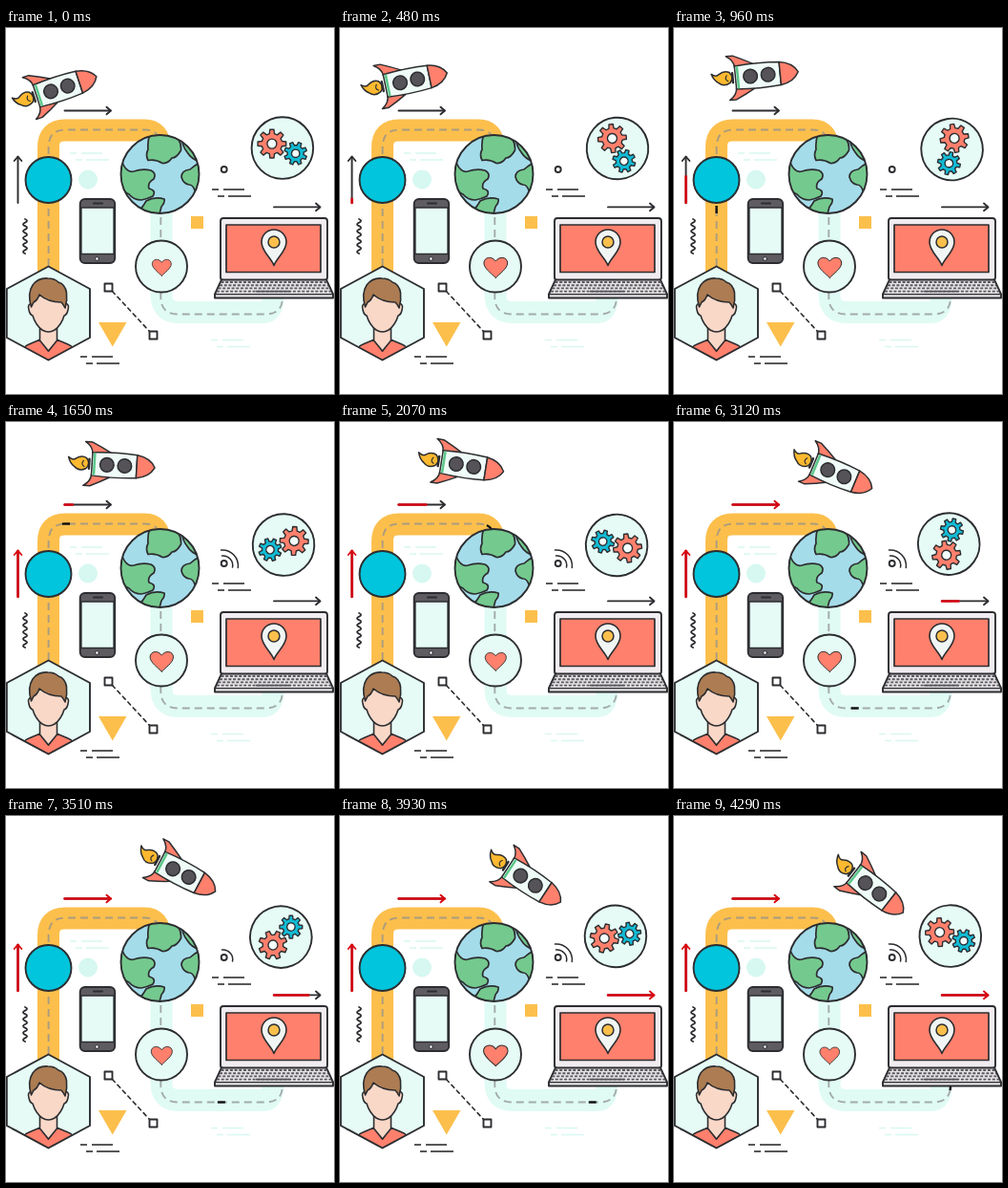
Recreate the animation shown at these times as an HTML page. Size 344x383 px, loop 4.32 s.

```html
<!DOCTYPE html>
<html lang="en">
<head>
<meta charset="utf-8">
<title>Connected journey</title>
<style>
  html, body { margin: 0; width: 100%; height: 100%; overflow: hidden; background: #fff; }
  svg { display: block; width: 344px; height: 383px; }
  .ink { stroke: #2c2d30; stroke-linejoin: round; stroke-linecap: round; }
  .none { fill: none; }
  .mint { fill: #e6fbf5; }
  .coral { fill: #ff806c; }
  .skin { fill: #f9d8c8; }
  .land { fill: #74c98e; }
</style>
</head>
<body>
<svg viewBox="0 0 344 383" stroke-width="1.9" xmlns="http://www.w3.org/2000/svg">
  <defs>
    <clipPath id="globeClip"><circle cx="161.5" cy="153" r="41"/></clipPath>
    <clipPath id="hexClip"><path d="M44.5 249.5 88 273V324L44.5 347.5 .8 324V273Z"/></clipPath>
    <path id="route" d="M44.6 340V125Q44.6 106.5 62 106.5H146Q162.3 106.5 162.3 125V281Q162.3 299.500 180 299.500H272Q290 299.500 290 282"/>
  </defs>

  <!-- road -->
  <g fill="none" stroke-width="23">
    <path stroke="#e0fbf4" d="M163 160V279Q163 297.500 181 297.500H270Q280 297.500 280 281"/>
    <path stroke="#fcbf4c" d="M44.500 270V125Q44.500 107 62 107H145Q161 107 161 125V140"/>
  </g>
  <use href="#route" fill="none" stroke="#8f9090" stroke-opacity=".75" stroke-dasharray="8 5"/>
  <use href="#route" id="pulse" fill="none" stroke="#111" stroke-width="2.400" stroke-dasharray="8 2000"/>

  <!-- small ornaments -->
  <g id="ornaments"></g>
  <circle cx="86" cy="158.500" r="10" fill="#d6f8f0"/>
  <path fill="#fcbf4c" d="M194 197h13v13h-13ZM97 308h29.500l-14.750 25.500Z"/>
  <g class="ink none">
    <path stroke-width="1.600" stroke-dasharray="4 4" d="M111.500 275.500 151 318"/>
    <path fill="#fff" d="M103.500 267.500h8v8h-8ZM150.500 317.500h8v8h-8Z"/>
    <path id="squiggle"/>
    <circle cx="228.700" cy="148" r="3"/>
    <g stroke-width="1.500">
      <path id="wave1" d="M226.500 140A10 10 0 0 1 237.500 152"/>
      <path id="wave2" d="M225.500 134A16.500 16.500 0 0 1 243.300 152.500"/>
    </g>
  </g>
  <g id="arrows"></g>

  <!-- globe -->
  <circle cx="161.500" cy="153" r="41" fill="#a5dcea"/>
  <g clip-path="url(#globeClip)" class="land ink" stroke-width="1.700">
    <path d="M152 109H172Q175 114 181 117Q184 121 183.500 128Q179 136 174 136Q170 142 164 141.500Q157 137 149 138.500Q146 133 149 127Q148 117 152 109Z"/>
    <path d="M116 138 122 141Q127 152 134 150Q143 147 152 149Q158 152 155 158Q148 162 150 168Q158 170 154 176Q148 179 142 180Q134 180 129 174Q121 170 118 164Z"/>
    <path d="M134 196Q143 189 147 181Q156 176 166 179Q167 183 163 187L160 198Z"/>
    <path d="M206 140Q198 143 193 148Q184 149 184 156Q186 163 192 164Q196 164 198 170L206 164Z"/>
    <path d="M184 114Q185 124 190 130Q195 138 204 140L194 110Z"/>
  </g>
  <circle cx="161.500" cy="153" r="41" class="ink none"/>

  <!-- badges -->
  <circle cx="44.500" cy="159" r="24" class="ink" fill="#00c5dc"/>
  <circle cx="163" cy="249.500" r="27" class="ink mint"/>
  <path id="heart" class="ink coral" stroke-width="1" d="M0 11C-4 7-12.500 1-12.500-4.500C-12.500-11-4-12.500 0-6.500C4-12.500 12.500-11 12.500-4.500C12.500 1 4 7 0 11Z"/>

  <!-- phone -->
  <rect x="77.700" y="179" width="36.500" height="67" rx="5" class="ink" fill="#5e5c60"/>
  <rect x="79" y="188" width="34" height="48.500" class="mint ink" stroke-width="1.300"/>
  <path d="M92 183.500h9" class="ink"/>
  <circle cx="95.500" cy="241.500" r="2" class="ink" fill="#ddd" stroke-width="1"/>

  <!-- portrait -->
  <g clip-path="url(#hexClip)">
    <rect y="248" width="90" height="101" class="mint"/>
    <g class="ink" stroke-width="1.600">
      <path class="coral" d="M13 350Q15 334 24 331L36 326 44.500 338 53 326 65 331Q74 334 76 350Z"/>
      <path class="skin" d="M35.500 310V327L44.500 338 53.500 327V310Z"/>
      <path class="skin" d="M27 288Q22 289 24 295Q25 300 28 301Q31 311 38 316Q44.500 320 51 316Q58 311 61 301Q64 300 65 295Q67 289 62 288L58 275H32Z"/>
      <path fill="#ad7c52" d="M26.500 292Q22 278 28 269Q34 261 44 262Q51 262 55 266Q62 268 63.500 277Q64.500 285 62 293Q60 289 58 287Q44 287 35 279Q33 285 29 287Z"/>
    </g>
  </g>
  <path class="ink none" d="M44.500 249.500 88 273V324L44.500 347.500 .8 324V273Z"/>

  <!-- laptop -->
  <rect x="225" y="199" width="112" height="65" rx="3" class="ink" fill="#f1ecef"/>
  <rect x="231" y="206" width="99" height="49.500" class="coral ink" stroke-width="1.700"/>
  <path class="ink" fill="#f1f6f5" stroke-width="1.600" d="M281 248.500C278 240 268 234 268 224A13 13 0 0 1 294 224C294 234 284 240 281 248.500Z"/>
  <circle cx="281" cy="224" r="6" class="ink" fill="#fcbf4c" stroke-width="1.500"/>
  <path class="ink" fill="#e6e3e6" d="M226 263.500H336L343 278.500V282.500H219V278.500Z"/>
  <g id="keys" stroke="#5b595e"></g>
  <path class="ink" d="M219 278.700H343" stroke-width="1.200"/>

  <g id="gears">
    <circle cy="-1.700" r="32.300" class="ink mint"/>
    <g class="ink" stroke-width="1.400">
      <path id="bigGear" class="coral" transform="translate(-11 -6.200)"/>
      <path id="smallGear" fill="#12bbd5" transform="translate(13.800 4) rotate(22.500)"/>
      <circle cx="-11" cy="-6.200" r="5" fill="#f4fffc"/>
      <circle cx="13.800" cy="4" r="4.200" fill="#f4fffc"/>
    </g>
  </g>

  <g id="rocket" class="ink" stroke-width="1.500">
    <path fill="#fdb92f" d="M-50-6Q-45-2-42-5Q-36-9-31-6Q-26 0-31 5Q-38 9-43 4Q-48 1-50-6Z"/>
    <path class="none" d="M-34-3Q-37 1-33 3" stroke-width="1.200"/>
    <path d="M-28-5V5" stroke-width="2.500"/>
    <path class="coral" d="M-33-23H-26Q-15-18-6-13L-25-11Q-25-18-33-23ZM-33 23H-26Q-15 18-6 13L-25 11Q-25 18-33 23Z"/>
    <path fill="#effbf7" d="M-25-12Q0-14 22-12V12Q0 14-25 12Z"/>
    <path d="M-22.500-10.500V10.500" stroke="#5cc78a" stroke-width="2.500"/>
    <path class="coral" d="M22-12Q36-10 41 0Q36 10 22 12Z"/>
    <circle cx="-9.300" r="7.300" fill="#555358"/>
    <circle cx="9.300" r="7.300" fill="#555358"/>
  </g>
</svg>
<script>
const LOOP = 4320, STEP = 30;
const RED = '#d8000f', INK = '#2c2d30';
const $ = id => document.getElementById(id);
const clamp = v => Math.max(0, Math.min(1, v));

function add(parent, tag, attrs) {
  const node = document.createElementNS('http://www.w3.org/2000/svg', tag);
  for (const key in attrs) node.setAttribute(key, attrs[key]);
  parent.appendChild(node);
  return node;
}

function gearPath(outer, inner, teeth) {
  const points = [], pitch = 2 * Math.PI / teeth;
  for (let i = 0; i < teeth; i++) {
    for (const [part, r] of [[-.31, inner], [-.18, outer], [.18, outer], [.31, inner]]) {
      const a = (i + part) * pitch;
      points.push((r * Math.cos(a)).toFixed(2) + ' ' + (r * Math.sin(a)).toFixed(2));
    }
  }
  return 'M' + points.join('L') + 'Z';
}

// A pair of broken strokes, the lower one shifted right
function strokePair(x, y, color) {
  add($('ornaments'), 'path', {
    d: `M${x} ${y}h7m5 0h22M${x + 6} ${y + 7}h7m4 0h24`,
    stroke: color, 'stroke-width': 1.6, fill: 'none'
  });
}

function makeArrow(x, y, turn, start, end) {
  const g = add($('arrows'), 'g', {
    transform: `translate(${x} ${y}) rotate(${turn})`, class: 'ink none'
  });
  add(g, 'path', { d: 'M0 0H48' });
  const head = add(g, 'path', { d: 'M44-3.800 48.500 0 44 3.800' });
  const fill = add(g, 'path', { style: `stroke:${RED}`, 'stroke-width': 2.5 });
  return t => {
    const p = clamp((t - start) / (end - start));
    fill.setAttribute('d', p ? `M0 0H${48 * p}` : '');
    head.style.stroke = p === 1 ? RED : INK;
  };
}

strokePair(67, 131, '#d9f7f1');
strokePair(215, 326.5, '#d9f7f1');
strokePair(216, 169, '#222');
strokePair(78, 344, '#222');

let wiggle = 'M20 200';
for (let i = 0; i < 10; i++) wiggle += `q${i % 2 ? -4 : 4} 1.800 0 3.600`;
$('squiggle').setAttribute('d', wiggle);

for (let row = 0; row < 4; row++) {
  const y = 266 + row * 3.2, inset = 2 + row * 1.5;
  add($('keys'), 'path', { d: `M${227.5 - inset} ${y}H${334.5 + inset}`, 'stroke-dasharray': '3 1.7' });
}
add($('keys'), 'path', { d: 'M262 275.6H298' });

$('bigGear').setAttribute('d', gearPath(15, 10.8, 8));
$('smallGear').setAttribute('d', gearPath(12, 8.6, 8));

const arrows = [
  makeArrow(12.5, 183, -90, 390, 1380),
  makeArrow(61.5, 86.5, 0, 1480, 2460),
  makeArrow(281, 187.4, 0, 2760, 3750)
];

// [time, distance along the route]
const stops = [[0, 0], [960, 150], [1650, 245], [2490, 435], [3120, 551], [3930, 626], [LOOP, 664]];
function travelled(t) {
  const i = Math.max(1, stops.findIndex(s => s[0] >= t));
  const [t0, d0] = stops[i - 1], [t1, d1] = stops[i];
  return d0 + (d1 - d0) * (t - t0) / (t1 - t0);
}

const show = (id, on) => $(id).setAttribute('visibility', on ? 'visible' : 'hidden');

function draw(t) {
  const p = t / LOOP;

  const orbit = (-30.4 + 70.6 * p) * Math.PI / 180;
  const x = 123.1 + 132.9 * Math.sin(orbit), y = 178.1 - 132.9 * Math.cos(orbit);
  $('rocket').setAttribute('transform', `translate(${x} ${y}) rotate(${-18 + 56.4 * p})`);

  $('gears').setAttribute('transform', `translate(289.9 127.3) rotate(${360 * p})`);

  const beat = .8 + .22 * Math.abs(Math.sin(Math.PI * t / 720));
  $('heart').setAttribute('transform', `translate(163.3 250.5) scale(${beat})`);

  $('pulse').setAttribute('stroke-dashoffset', 4 - travelled(t));
  show('pulse', t > 0);
  arrows.forEach(update => update(t));

  const phase = t < 1080 ? 0 : t % 1080;
  show('wave1', phase >= 180);
  show('wave2', phase >= 450);
}

const begun = performance.now();
function tick() {
  const t = (performance.now() - begun) % LOOP;
  draw(Math.floor(t / STEP) * STEP);
  requestAnimationFrame(tick);
}
draw(0);
requestAnimationFrame(tick);
</script>
</body>
</html>
```
